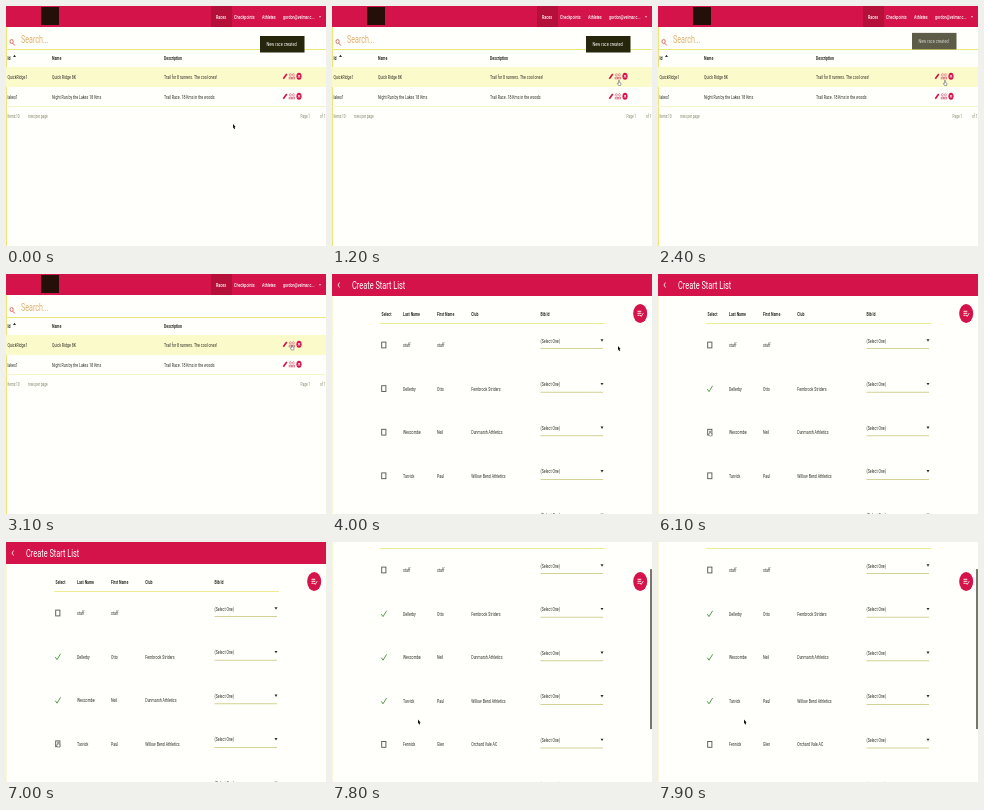
Write an HTML page with a canvas that moves like this. It is 320 px wide and 240 px high and loops after 8000 ms.

```html
<!DOCTYPE html>
<html lang="en">
<head>
<meta charset="utf-8">
<title>Race start list</title>
<style>
html, body { margin: 0; width: 100%; height: 100%; overflow: hidden; background: #fffffb; }
canvas { display: block; width: 320px; height: 240px; }
</style>
</head>
<body>
<canvas id="stage"></canvas>
<script>
const canvas = document.getElementById('stage');
const ctx = canvas.getContext('2d');
const dpr = window.devicePixelRatio || 1;
canvas.width = 320 * dpr;
canvas.height = 240 * dpr;

const LOOP = 8000, STEP = 100;
const ASPECT = 0.65; // the wide page is shown on a 4:3 stage
const RED = '#d3134a', INK = '#2c2c24', LINE = '#ece678', PALE = '#f6f4c8', PAPER = '#fffffb';
const FORM_AT = 3400;

// time, x, y
const path = [
  [0, 227, 118], [400, 229, 116], [1000, 287, 75.5], [2500, 287, 75.5], [2900, 286, 72],
  [4200, 286, 72], [5000, 53, 114], [5500, 53, 114], [6000, 52, 158], [6300, 52, 158],
  [6800, 52, 201], [7200, 52, 201], [7600, 86, 177.5], [8000, 86, 177.5]
];

// last name, first name, club, time of ticking
const runners = [
  ['staff', 'staff', '', Infinity],
  ['Dellerby', 'Otto', 'Fernbrook Striders', 5400],
  ['Wexcombe', 'Neil', 'Dunmarsh Athletics', 6200],
  ['Tarvick', 'Paul', 'Willow Bend Athletics', 7100],
  ['Fennick', 'Glen', 'Orchard Vale AC', Infinity],
  ['Lowden', 'Mark', '', Infinity]
];

const races = [
  ['QuickRidge1', 'Quick Ridge 8K', 'Trail for 8 runners. The cool ones!'],
  ['lakes1', 'Night Run by the Lakes 18 Kms', 'Trail Race. 18 Kms in the woods']
];

const clamp = v => Math.max(0, Math.min(1, v));
const ease = v => (v = clamp(v), v * v * (3 - 2 * v));

function rect(x, y, w, h, color) {
  ctx.fillStyle = color;
  ctx.fillRect(x, y, w, h);
}

function text(s, x, y, size = 5.5, color = INK, weight = 400) {
  ctx.save();
  ctx.translate(x, y);
  ctx.scale(ASPECT, 1);
  ctx.font = `${weight} ${size}px Roboto, sans-serif`;
  ctx.textBaseline = 'alphabetic';
  ctx.fillStyle = color;
  ctx.fillText(s, 0, size * 0.36);
  ctx.restore();
}

function trace(points) {
  ctx.beginPath();
  points.forEach(([x, y]) => ctx.lineTo(x, y));
}

function stroke(points, color, width = 0.8) {
  trace(points);
  ctx.strokeStyle = color;
  ctx.lineWidth = width;
  ctx.stroke();
}

function fill(points, color) {
  trace(points);
  ctx.closePath();
  ctx.fillStyle = color;
  ctx.fill();
}

function oval(x, y, rx, ry, color, line) {
  ctx.beginPath();
  ctx.ellipse(x, y, rx, ry, 0, 0, 7);
  ctx.fillStyle = ctx.strokeStyle = color;
  ctx.lineWidth = line || 1;
  line ? ctx.stroke() : ctx.fill();
}

function down(x, y, color, w = 1.5, h = 2.4) {
  fill([[x - w, y - h / 2], [x + w, y - h / 2], [x, y + h / 2]], color);
}

function actions(y) {
  stroke([[277.3, y + 2.4], [280.8, y - 2.2]], RED, 1.7);
  for (const x of [284.4, 287.4]) {
    oval(x, y - 1.5, 0.9, 1.2, '#dc6680', 0.7);
    ctx.strokeRect(x - 1.3, y + 0.9, 2.6, 1.7);
  }
  oval(293, y, 2.6, 3.5, RED);
  stroke([[292, y - 1.4], [294, y + 1.4]], '#fff', 0.7);
  stroke([[294, y - 1.4], [292, y + 1.4]], '#fff', 0.7);
}

function drawToast(t) {
  const out = clamp((t - 2300) / 400);
  if (out === 1) return;
  ctx.save();
  ctx.globalAlpha = 1 - out;
  ctx.translate(0, -20 * ease(out));
  rect(254, 30, 44.5, 16.5, '#26260c');
  text('New race created', 260.5, 38, 6, '#fff');
  ctx.restore();
}

function drawList(t) {
  rect(0, 0, 320, 21, RED);
  rect(205, 0, 21, 21, '#b41039');
  rect(35, 1, 18, 18, '#241008');
  text('Races', 210, 11, 5.7, '#fff', 500);
  text('Checkpoints', 228, 11, 5.7, '#fff', 500);
  text('Athletes', 256, 11, 5.7, '#fff', 500);
  text('gordon@velmar.c...', 277, 11, 5.6, '#fff', 500);
  down(314, 11, '#fff', 1, 1.5);

  rect(0, 21, 1, 219, LINE);
  oval(5.6, 35.5, 1.6, 2.1, '#d5645a', 0.9);
  stroke([[6.8, 37.2], [8.8, 39.5]], '#d5645a', 1);
  text('Search...', 15, 32.6, 11, '#dfb070');
  rect(0, 43, 320, 1, LINE);

  text('Id', 1.5, 52, 5.4, INK, 700);
  fill([[7, 51], [10, 51], [8.5, 48.8]], INK);
  text('Name', 46, 52, 5.4, INK, 700);
  text('Description', 158, 52, 5.4, INK, 700);
  rect(0, 61, 320, 20, '#fbfacb');
  rect(0, 100, 320, 1, PALE);
  races.forEach(([id, name, about], i) => {
    const y = 71.3 + i * 20;
    text(id, 1.5, y);
    text(name, 46, y);
    text(about, 158, y);
    actions(y - 1);
  });
  text('Items:10', 1.5, 110, 4.8, '#80806a');
  text('rows per page', 22, 110, 4.8, '#80806a');
  text('Page 1', 294.5, 110, 4.8, '#80806a');
  text('of 1', 314, 110, 4.8, '#80806a');
  drawToast(t);
}

function drawRunner([last, first, club, ticked], i, t) {
  const y = 71 + i * 43.6;
  if (t >= ticked) {
    stroke([[49.3, y + 0.5], [51, y + 3], [54.6, y - 2.8]], '#589b4c', 1);
  } else {
    ctx.strokeStyle = '#55554c';
    ctx.lineWidth = 0.9;
    ctx.strokeRect(49.7, y - 2.9, 4.2, 5.8);
  }
  text(last, 71, y);
  text(first, 105, y);
  text(club, 139.3, y);
  text('(Select One)', 208.5, y - 4.3);
  down(270, y - 4.5, INK);
  rect(208.5, y + 3.2, 62.5, 0.8, '#c9c67c');
}

function drawForm(t) {
  const scroll = 43 * ease((t - 7300) / 500);
  ctx.save();
  ctx.translate(0, -scroll);
  rect(0, 0, 320, 22, RED);
  stroke([[7.5, 8.5], [6, 11], [7.5, 13.5]], '#fff', 0.8);
  text('Create Start List', 20, 11, 11.4, '#fff');
  rect(0, 22, 0.7, 262, PALE);

  [['Select', 49.5], ['Last Name', 71], ['First Name', 105], ['Club', 139.3], ['Bib Id', 208.5]]
    .forEach(([s, x]) => text(s, x, 40.5, 5.4, INK, 700));
  rect(48, 49, 225, 0.8, LINE);
  runners.forEach((r, i) => drawRunner(r, i, t));
  ctx.restore();

  oval(308.2, 39.5, 7, 9.5, RED);
  for (const [y, w] of [[36.8, 3.8], [38.8, 3.8], [40.8, 2.2]]) rect(305.5, y, w, 0.9, '#fff');
  stroke([[308.2, 41], [309.2, 42.4], [311.2, 39.2]], '#fff', 0.8);
  if (scroll) rect(318, 3 + scroll * 0.56, 2, 160, '#77776c');
}

function cursorAt(t) {
  const i = path.findIndex(p => p[0] > t);
  const [t0, x0, y0] = path[i - 1], [t1, x1, y1] = path[i];
  const k = ease((t - t0) / (t1 - t0));
  return [x0 + (x1 - x0) * k, y0 + (y1 - y0) * k];
}

function drawCursor(t) {
  const [x, y] = cursorAt(t);
  const onAction = t < FORM_AT && x > 275 && y < 80;
  const onBox = t > FORM_AT && t < 7300 && x < 56;
  ctx.save();
  ctx.translate(x, y);
  if (onAction || onBox) {
    const hand = [[-0.5, -1], [0.5, -1], [0.5, 1], [2, 1.6], [1.7, 4], [-0.5, 4], [-1.7, 1.8], [-0.5, 2], [-0.5, -1]];
    fill(hand, '#fff');
    stroke(hand, '#505058', 0.5);
  } else {
    fill([[0, 0], [0, 4.4], [0.8, 3.6], [1.5, 5.2], [2.2, 4.8], [1.6, 3.2], [2.6, 3.1]], '#111');
  }
  ctx.restore();
}

const start = performance.now();
function tick() {
  const t = Math.floor((performance.now() - start) % LOOP / STEP) * STEP;
  ctx.setTransform(dpr, 0, 0, dpr, 0, 0);
  rect(0, 0, 320, 240, PAPER);
  (t < FORM_AT ? drawList : drawForm)(t);
  drawCursor(t);
  requestAnimationFrame(tick);
}
tick();
</script>
</body>
</html>
```
